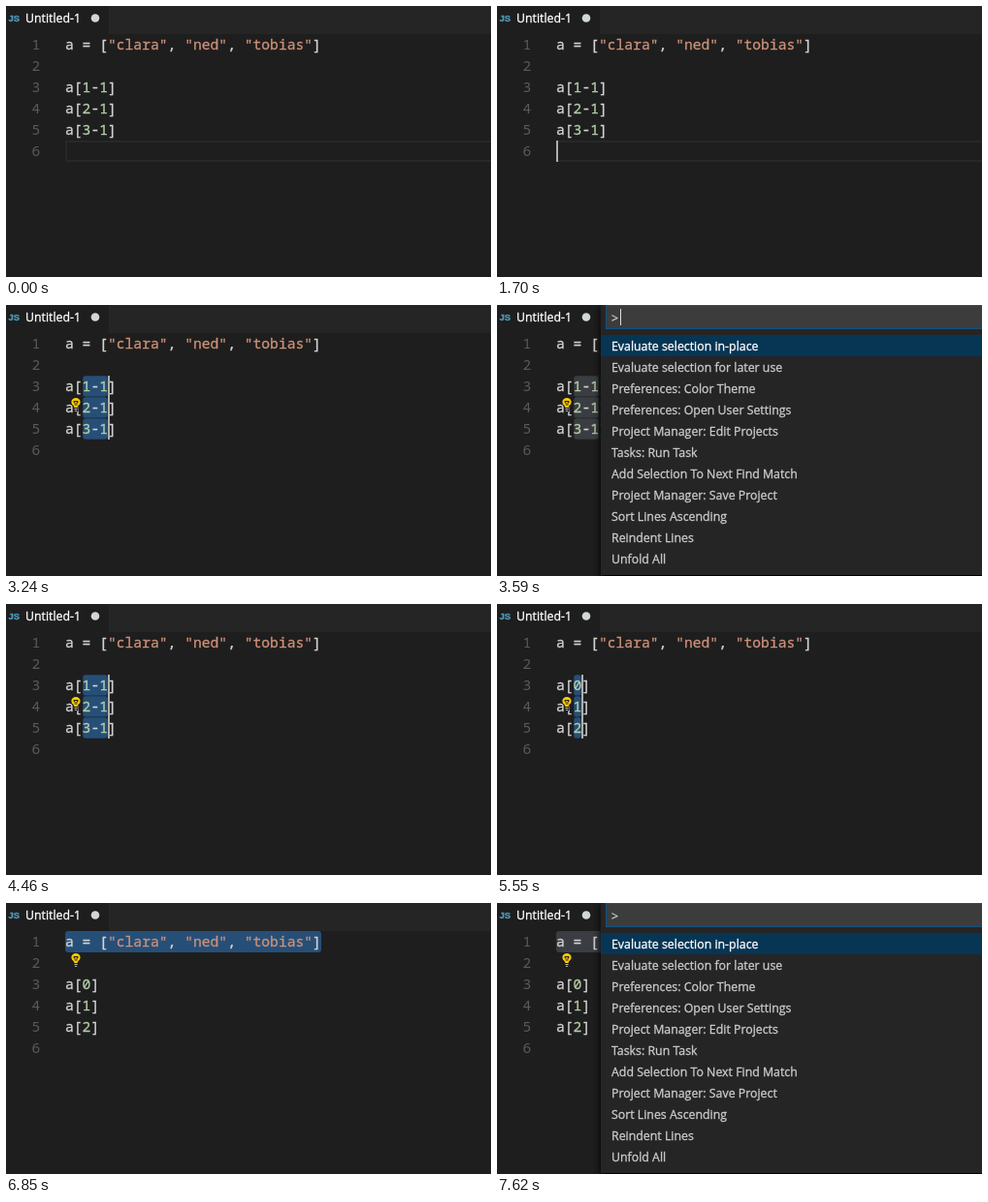
An HTML page that plays this animation: 500x280 px, repeating every 8 s.

```html
<!DOCTYPE html>
<html lang="en">
<head>
<meta charset="utf-8">
<title>Evaluate selection</title>
<style>
  html, body { margin: 0; width: 100%; height: 100%; overflow: hidden; background: #1e1e1e; }
  svg { display: block; width: 500px; height: 280px; }
  /* a hairline stroke gives the text its slightly heavier weight */
  text, tspan { fill: currentColor; stroke: currentColor; stroke-width: .3; }
  .code { font: 14.66px "Noto Sans Mono", "DejaVu Sans Mono", monospace; color: #d4d4d4; }
  .ui { font: 12.35px "Open Sans", "Noto Sans", sans-serif; color: #ccc; }
  .badge { font: bold 9.5px "Liberation Sans", sans-serif; color: #519aba; }
  .no { color: #5a5a5a; text-anchor: end; stroke: none; }
  .str { color: #ce9178; }
  .num { color: #b5cea8; }
  .white { color: #fff; }
  .caret { fill: #aeafad; shape-rendering: crispEdges; }
  .line { fill: none; stroke: #282828; stroke-width: 2; }
  .match { fill: rgba(0, 100, 0, .1); stroke: #888; }
  .sel { fill: #264f78; }
  .idle { fill: #3a3d41; }
  .multi { stroke: #1e1e1e; stroke-opacity: .5; }
</style>
</head>
<body>
<svg id="stage" viewBox="0 0 500 280">
  <defs>
    <filter id="blur" x="-10%" y="-10%" width="120%" height="120%"><feGaussianBlur stdDeviation="4"/></filter>
    <g id="bulb">
      <path fill="#1e1e1e" d="M8 0C5 0 2.5 2 2.5 5c0 3 2.7 4 3 6v3.4L7 16h2l1.5-1.6V11c.3-2 3-3 3-6C13.5 2 11 0 8 0z"/>
      <path fill="#fc0" fill-rule="evenodd" d="M8 .9C5.4 .9 3.4 2.7 3.4 5c0 3.2 2.7 3.5 3 6h3.2c.3-2.5 3-2.8 3-6C12.6 2.7 10.6 .9 8 .9zM6.4 4h3.2a1 1 0 0 1 0 2l-.5 3h-.6V6l.9-1H6.5l1 1v3H7l-.5-3a1 1 0 0 1-.1-2z"/>
      <path fill="#c5c5c5" d="M6.5 12h3v1h-3zM6.5 14h3l-.9 1H7.5z"/>
    </g>
  </defs>
  <rect width="500" height="280" fill="#1e1e1e"/>
  <rect x="106" width="394" height="29" fill="#252526"/>
  <text class="badge" x="2.5" y="16">JS</text>
  <text class="ui white" x="20" y="17">Untitled-1</text>
  <circle cx="92" cy="12.5" r="4.3" fill="#d0d8d4"/>
</svg>
<script>
const LOOP = 8000, CHAR = 8.797, ROW = 22;
const stage = document.getElementById('stage');
const timed = [];
const colX = c => Math.round(61 + c * CHAR);
const rowY = r => 29 + (r - 1) * ROW;

// spans: [[start, end], ...] in ms; without them the part always shows
function add(tag, attrs, spans, parent = stage) {
  const el = document.createElementNS('http://www.w3.org/2000/svg', tag);
  for (const k in attrs) el.setAttribute(k, attrs[k]);
  parent.append(el);
  if (spans) timed.push({ el, spans });
  return el;
}

function text(x, y, cls, parts, spans, parent) {
  const el = add('text', { x, y, class: cls }, spans, parent);
  for (const [s, c] of parts) add('tspan', c ? { class: c } : {}, null, el).textContent = s;
}

const box = (x, y, width, height, cls, spans, rx = 0) =>
  add('rect', { x, y, width, height, rx, class: cls }, spans);
const lineBox = (r, ...spans) => box(62, rowY(r) + 1, 450, 20, 'line', spans);
const select = (r, from, to, cls, ...spans) =>
  box(colX(from), rowY(r), colX(to) - colX(from), ROW, cls, spans, 3);
const caret = (r, c, ...spans) => box(colX(c), rowY(r), 2, ROW, 'caret', spans);
const match = (r, ...spans) => [1, 5].forEach(c =>
  box(colX(c) + .5, rowY(r) + .5, 8, ROW - 1, 'match', spans));
const code = (r, parts, spans) => text(61, rowY(r) + 16, 'code', parts, spans);

const OPEN = [[3590, 4460], [7160, LOOP]];
const rows = [3, 4, 5];
const leave = r => r === 5 ? 5770 : 5660;

// Layers behind the text
lineBox(6, [0, 1810]);
lineBox(5, [1810, 2700]);
lineBox(1, [5770, 6420]);
for (const r of rows) {
  select(r, 2, 3, 'sel multi', [2700, 2800], [4570, leave(r)]);
  select(r, 2, 4, 'sel multi', [2800, 3020]);
  select(r, 2, 5, 'sel multi', [3020, 3590], [4460, 4570]);
  select(r, 2, 5, 'idle multi', [3590, 4460]);
}
select(1, 0, 30, 'sel', [6420, 7160]);
select(1, 0, 30, 'idle', [7160, LOOP]);
match(3, [2350, 2700]);
match(4, [2240, 2700]);
match(5, [1810, 2700]);

// Text
for (let r = 1; r <= 6; r++) text(35.2, rowY(r) + 16, 'code no', [[r, 'no']]);
code(1, [['a = ['], ['"clara"', 'str'], [', '], ['"ned"', 'str'], [', '], ['"tobias"', 'str'], [']']]);
rows.forEach((r, i) => {
  code(r, [['a['], [i + 1, 'num'], ['-'], ['1', 'num'], [']']], [[0, 4570]]);
  code(r, [['a['], [i, 'num'], [']']], [[4570, LOOP]]);
});

// Carets
caret(6, 0, [710, 1260], [1700, 1810]);
for (const r of rows) {
  caret(r, 2, [{ 3: 2240, 4: 2130, 5: 1810 }[r], 2700]);
  caret(r, 3, [2700, 2800], [4570, 5000], [5550, leave(r)]);
  caret(r, 4, [2800, 3020]);
  caret(r, 5, [3020, 3590], [4460, 4570]);
}
caret(1, 0, [5770, 6320]);
caret(1, 30, [6420, 6850]);

add('use', { href: '#bulb', x: 64, y: 95 }, [[3240, 5660]]);
add('use', { href: '#bulb', x: 64, y: 51 }, [[6630, LOOP]]);

// Command palette
const palette = add('g', {}, OPEN);
const panel = (x, y, width, height, fill, more) =>
  add('rect', { x, y, width, height, fill, ...more }, null, palette);
panel(107, 0, 420, 300, '#000', { filter: 'url(#blur)' });
panel(107, 0, 393, 279, '#252526');
panel(112.5, .5, 420, 24, '#3c3c3c', { stroke: '#0e5484' });
panel(107, 31, 393, ROW, '#073655');
text(118, 18, 'ui', [['>']], null, palette);
[
  'Evaluate selection in-place', 'Evaluate selection for later use',
  'Preferences: Color Theme', 'Preferences: Open User Settings',
  'Project Manager: Edit Projects', 'Tasks: Run Task',
  'Add Selection To Next Find Match', 'Project Manager: Save Project',
  'Sort Lines Ascending', 'Reindent Lines', 'Unfold All'
].forEach((s, i) => text(118, 47 + i * ROW, i ? 'ui' : 'ui white', [[s]], null, palette));
add('rect', { x: 127, y: 4, width: 1, height: 17, fill: '#ddd' }, [[3590, 4140], [7160, 7620]]);

const start = performance.now();
function draw() {
  const t = (performance.now() - start) % LOOP;
  for (const { el, spans } of timed)
    el.style.display = spans.some(([a, b]) => t >= a && t < b) ? '' : 'none';
  requestAnimationFrame(draw);
}
draw();
</script>
</body>
</html>
```
